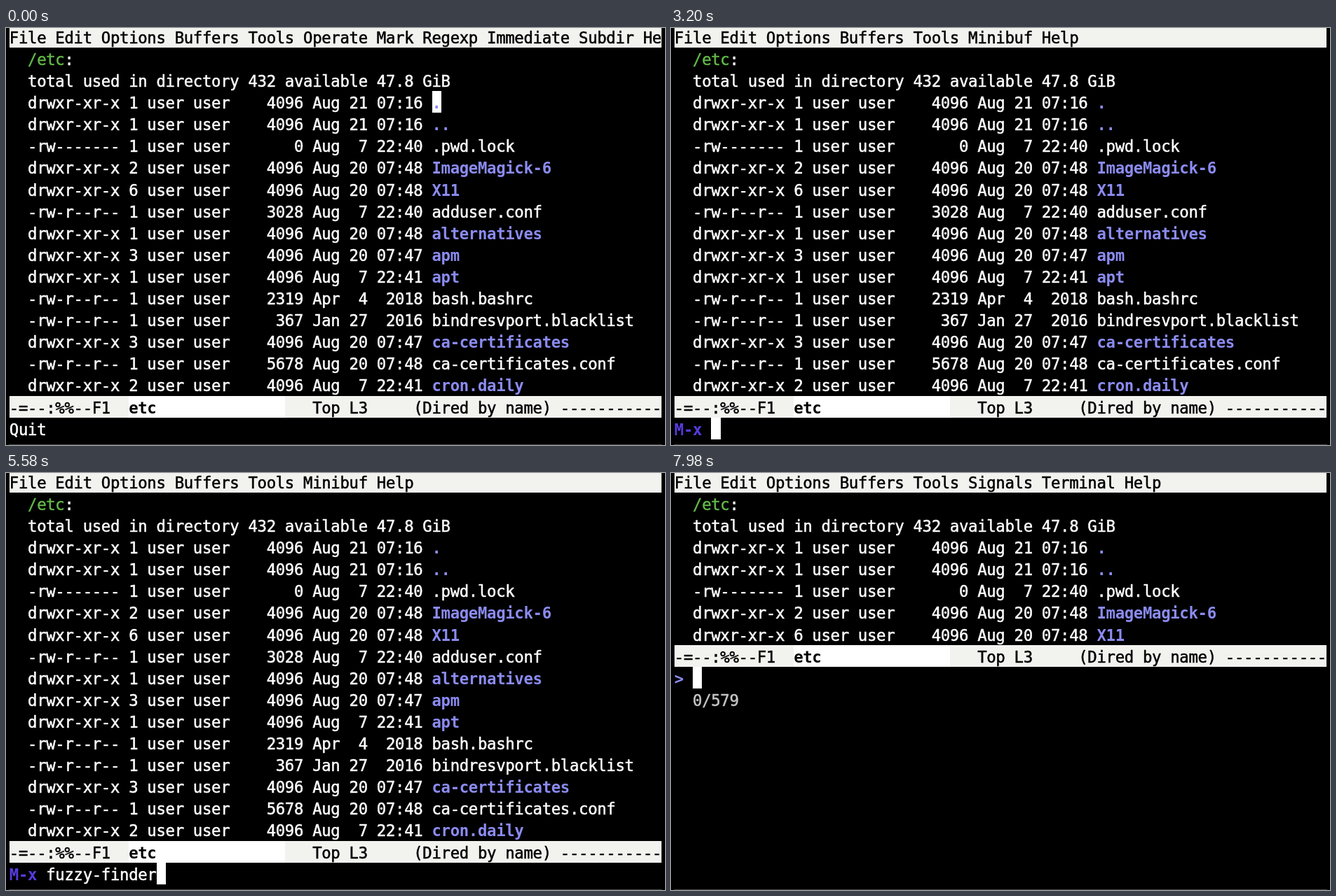
Animation, 940 px wide and 596 px high, one loop 8 s. Source, as an HTML page with a canvas:

```html
<!DOCTYPE html>
<html lang="en">
<head>
<meta charset="utf-8">
<title>Terminal directory listing</title>
<style>
  html, body { margin: 0; width: 100%; height: 100%; overflow: hidden; background: #000; }
  canvas { display: block; }
</style>
</head>
<body>
<canvas id="stage" width="940" height="596"></canvas>
<script>
const ctx = document.getElementById('stage').getContext('2d');
const LOOP = 8000, LEFT = 5, TOP = -3.2, CELL_W = 13.1, CELL_H = 31.1, BASELINE = 25;
const FONT = '22.3px "DejaVu Sans Mono", monospace';
const WHITE = '#fff', BLACK = '#000', BAR = '#f2f2ef';
const BLUE = '#8b8bf2', PROMPT = '#583be0', GREEN = '#62b849', GREY = '#c6c6c6';

const MENU = 'File Edit Options Buffers Tools ';
const DIRED_MENU = MENU + 'Operate Mark Regexp Immediate Subdir He';
const INPUT_MENU = MENU + 'Minibuf Help';
const TERM_MENU = MENU + 'Signals Terminal Help';

// links | size | date | time | name; a trailing slash marks a directory
const FILES = `1|4096|Aug 21|07:16|./
1|4096|Aug 21|07:16|../
1|0|Aug  7|22:40|.pwd.lock
2|4096|Aug 20|07:48|ImageMagick-6/
6|4096|Aug 20|07:48|X11/
1|3028|Aug  7|22:40|adduser.conf
1|4096|Aug 20|07:48|alternatives/
3|4096|Aug 20|07:47|apm/
1|4096|Aug  7|22:41|apt/
1|2319|Apr  4|2018|bash.bashrc
1|367|Jan 27|2016|bindresvport.blacklist
3|4096|Aug 20|07:47|ca-certificates/
1|5678|Aug 20|07:48|ca-certificates.conf
2|4096|Aug  7|22:41|cron.daily/`.split('\n').map(line => line.split('|'));

// Screen states and the times (ms) at which they begin
const STEPS = [
  { at: 0, echo: 'Quit' },
  { at: 2200, echo: '' },
  { at: 2840, input: '' },
  { at: 3900, input: 'f' },
  { at: 4250, input: 'fu' },
  { at: 4500, input: 'fuz' },
  { at: 4780, input: 'fuzz' },
  { at: 5300, input: 'fuzzy-finder' },
  { at: 7840, finder: true }
];

const cellX = col => LEFT + col * CELL_W;
const cellY = row => TOP + row * CELL_H;

function block(row, col, count, color) {
  const x = Math.round(cellX(col)), y = Math.round(cellY(row));
  ctx.fillStyle = color;
  ctx.fillRect(x, y, Math.round(cellX(col + count)) - x, Math.round(cellY(row + 1)) - y);
}

// A thin outline gives regular text its heavier terminal weight.
function write(row, col, text, color = WHITE, bold = false) {
  ctx.font = (bold ? 'bold ' : '') + FONT;
  ctx.fillStyle = ctx.strokeStyle = color;
  ctx.lineWidth = 0.5;
  ctx.lineJoin = 'round';
  ctx.textAlign = 'center';
  [...text].forEach((char, i) => {
    const x = cellX(col + i + 0.5), y = cellY(row) + BASELINE;
    ctx.fillText(char, x, y);
    if (!bold) ctx.strokeText(char, x, y);
  });
}

function cursor(row, col) {
  block(row, col, 1, WHITE);
}

function drawMenu(text) {
  block(0, 0, 71, BAR);
  write(0, 0, text, BLACK);
}

function drawListing(count, active) {
  write(1, 2, '/etc', GREEN);
  write(1, 6, ':');
  write(2, 2, 'total used in directory 432 available 47.8 GiB');
  FILES.slice(0, count).forEach(([links, size, date, time, entry], i) => {
    const row = i + 3, isDir = entry.endsWith('/');
    const mode = isDir ? 'drwxr-xr-x' : entry === '.pwd.lock' ? '-rw-------' : '-rw-r--r--';
    write(row, 2, `${mode} ${links} user user ${size.padStart(7)} ${date} ${time.padStart(5)}`);
    if (active && i === 0) cursor(row, 46);
    write(row, 46, entry.replace('/', ''), isDir ? BLUE : WHITE, isDir);
  });
}

function drawModeLine(row) {
  block(row, 0, 71, BAR);
  block(row, 13, 17, WHITE);
  write(row, 0, '-=--:%%--F1', BLACK);
  write(row, 13, 'etc', BLACK, true);
  write(row, 33, 'Top L3     (Dired by name) -----------', BLACK);
}

function draw(step) {
  ctx.fillStyle = BLACK;
  ctx.fillRect(0, 0, 940, 596);
  ctx.fillStyle = '#444';
  ctx.fillRect(4, 595, 932, 1);

  if (step.finder) {
    drawMenu(TERM_MENU);
    drawListing(5, false);
    drawModeLine(8);
    write(9, 0, '>', BLUE, true);
    cursor(9, 2);
    write(10, 2, '0/579', GREY);
    return;
  }

  const typing = step.input !== undefined;
  drawMenu(typing ? INPUT_MENU : DIRED_MENU);
  drawListing(FILES.length, !typing);
  drawModeLine(17);
  if (typing) {
    write(18, 0, 'M-x', PROMPT, true);
    write(18, 4, step.input);
    cursor(18, 4 + step.input.length);
  } else {
    write(18, 0, step.echo);
  }
}

function frame() {
  const time = performance.now() % LOOP;
  draw(STEPS.findLast(step => step.at <= time));
  requestAnimationFrame(frame);
}
frame();
</script>
</body>
</html>
```
